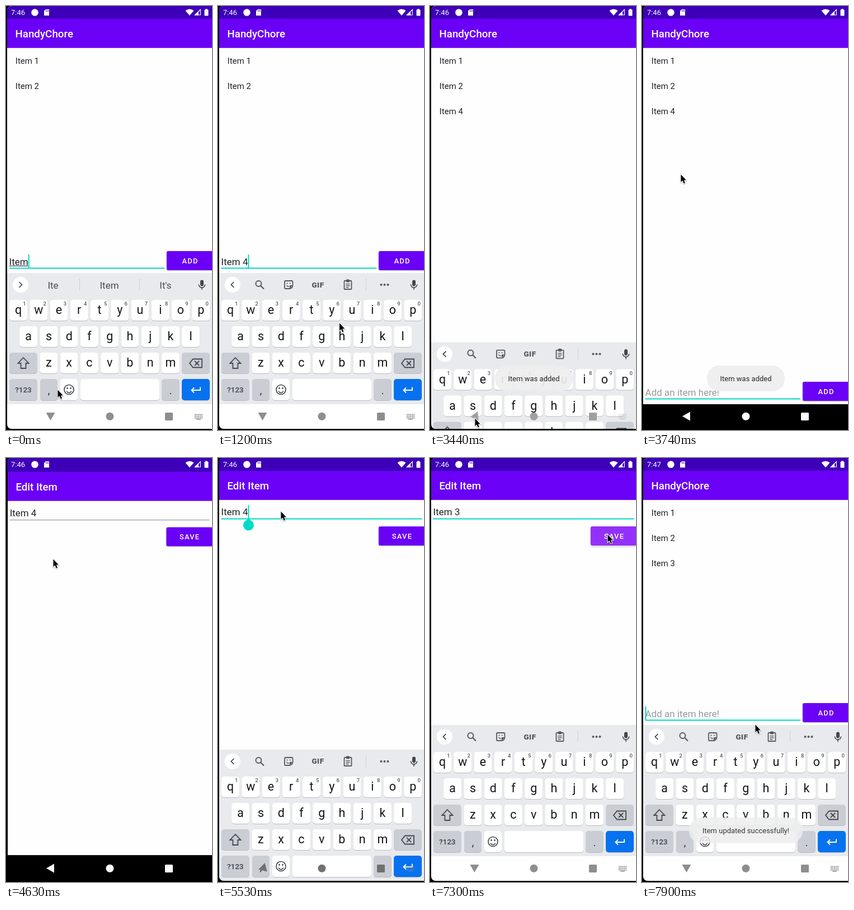
These frames come from a looping animation (368 px wide and 756 px high, 8000 ms). An HTML page with a canvas:

```html
<!DOCTYPE html>
<html lang="en">
<head>
<meta charset="utf-8">
<title>Task list</title>
<style>
html, body { margin: 0; width: 368px; height: 756px; overflow: hidden; background: #000; }
canvas { display: block; width: 368px; height: 756px; }
</style>
</head>
<body>
<canvas id="stage"></canvas>
<script>
const W = 368, H = 756, LOOP = 8000;
const PURPLE = '#6a00f6', DARK = '#3d00b8', TEAL = '#00dac6', PAPER = '#fefefe', INK = '#202124', ICON = '#55585c';
const FIELD = 5.6;
const canvas = document.getElementById('stage');
const dpr = window.devicePixelRatio || 1;
canvas.width = W * dpr;
canvas.height = H * dpr;
const c = canvas.getContext('2d');

const clamp = v => Math.max(0, Math.min(1, v));
const part = (t, a, b) => clamp((t - a) / (b - a));
const within = (t, a, b) => t >= a && t < b;

const ANCHORS = [0, 3590, 4630, 6270, 7300];
function stepTime(t) {
  const a = ANCHORS.filter(v => v <= t).pop();
  return a + Math.floor((t - a) / 150) * 150;
}

function rect(x, y, w, h, color) {
  c.fillStyle = color;
  c.fillRect(x, y, w, h);
}
function box(x, y, w, h, r, color) {
  c.fillStyle = color;
  c.beginPath();
  c.roundRect(x, y, w, h, r);
  c.fill();
}
function disc(x, y, r, color) {
  c.fillStyle = color;
  c.beginPath();
  c.arc(x, y, r, 0, 7);
  c.fill();
}
function trace(pts, close) {
  c.beginPath();
  pts.forEach(([x, y], i) => i ? c.lineTo(x, y) : c.moveTo(x, y));
  if (close) c.closePath();
}
function poly(pts, color) {
  trace(pts, true);
  c.fillStyle = color;
  c.fill();
}
function line(pts, color, width = 1.6, close = false) {
  trace(pts, close);
  c.strokeStyle = color;
  c.lineWidth = width;
  c.stroke();
}
function frame(x, y, w, h, r, color, width = 1.6) {
  c.beginPath();
  c.roundRect(x, y, w, h, r);
  c.strokeStyle = color;
  c.lineWidth = width;
  c.stroke();
}
function text(s, x, y, size, color, align = 'left', weight = 400, gap = 0) {
  c.font = `${weight} ${size}px Roboto, sans-serif`;
  c.letterSpacing = gap + 'px';
  c.textAlign = align;
  c.fillStyle = color;
  c.fillText(s, x, y);
  const w = c.measureText(s).width;
  c.letterSpacing = '0px';
  return w;
}
function layer(alpha, draw) {
  c.save();
  c.globalAlpha *= alpha;
  draw();
  c.restore();
}

function statusBar(t) {
  text(t >= 7600 ? '7:47' : '7:46', 9, 16.3, 13, '#fff');
  disc(51.5, 11.5, 6.3, '#fff');
  poly([[71, 6], [77, 6], [77, 17], [68, 17], [68, 9]], '#fff');
  [71, 73, 75].forEach(x => rect(x, 7.5, 1, 2.5, DARK));
  c.fillStyle = '#fff';
  c.beginPath();
  c.moveTo(328, 17);
  c.lineTo(320.5, 8.2);
  c.quadraticCurveTo(328, 3, 335.5, 8.2);
  c.fill();
  line([[337.5, 16], [347.3, 16], [347.3, 6.5]], '#fff', 1.2, true);
  poly([[337, 16.5], [344, 16.5], [344, 9.8]], '#fff');
  box(354.5, 6.5, 7, 11, 1, '#fff');
  rect(356.5, 5, 3, 2, '#fff');
}

function appScreen(title) {
  rect(2, 0, 372, 710, PAPER);
  rect(2, 0, 372, 23, DARK);
  rect(2, 22.5, 372, 52.3, PURPLE);
  text(title, 16.4, 56, 18.8, '#fff', 'left', 500);
}

function button(label, y, lit) {
  c.save();
  c.shadowColor = 'rgba(0,0,0,.3)';
  c.shadowBlur = (lit ? 4 : 2) * dpr;
  c.shadowOffsetY = dpr;
  box(287, y, 83, 34, 3, lit ? '#9430fb' : PURPLE);
  c.restore();
  text(label, 329, y + 22, 13, '#fff', 'center', 500, 1.2);
}

const blink = (t, since) => Math.floor((t - since) / 500) % 2 === 0;

function mainScreen(t) {
  appScreen('HandyChore');
  const items = ['Item 1', 'Item 2'];
  if (t >= 1950) items.push(t >= 7450 ? 'Item 3' : 'Item 4');
  items.forEach((s, i) => text(s, 16.8, 103 + i * 45, 15, INK));

  const dy = within(t, 3150, 7450) ? 233 : 0;
  const typed = t < 300 ? 'Item' : t < 750 ? 'Item ' : t < 1950 ? 'Item 4' : '';
  let w = 0;
  if (typed) w = text(typed, FIELD, 461.5 + dy, 17, INK);
  else text('Add an item here!', FIELD, 461.5 + dy, 17, '#999');
  if (t < 300) rect(FIELD, 463, w, 1, INK);
  rect(FIELD, 466.5 + dy, 277.4, 2, TEAL);
  const since = t < 300 ? 0 : t < 750 ? 300 : t < 1800 ? 750 : t < 7450 ? 1800 : 7450;
  if (blink(t, since) && !within(t, 3300, 7450)) rect(FIELD + w, 443 + dy, 2, 24, TEAL);
  button('ADD', 437 + dy, within(t, 1800, 2100));
}

function editScreen(t) {
  appScreen('Edit Item');
  const focus = t >= 5380;
  const typed = t < 6270 ? 'Item 4' : t < 6720 ? 'Item ' : 'Item 3';
  const w = text(typed, FIELD, 102, 17, INK);
  rect(FIELD, focus ? 107.5 : 108.5, 359, focus ? 2 : 1, focus ? TEAL : '#858585');
  const since = t < 6270 ? 5330 : t < 6720 ? 6270 : 6720;
  if (focus && blink(t, since)) rect(FIELD + w, 84, 2, 24, TEAL);
  if (within(t, 5380, 6270)) {
    disc(54.5, 119.7, 9.5, TEAL);
    poly([[54.5, 108.5], [60.8, 112.7], [48.2, 112.7]], TEAL);
  }
  button('SAVE', 122, within(t, 7300, 7600));
}

function mic() {
  box(347, 488.5, 6, 11, 3, '#44474a');
  c.beginPath();
  c.arc(350, 496.5, 5.6, 0, Math.PI);
  c.strokeStyle = '#44474a';
  c.lineWidth = 1.6;
  c.stroke();
  rect(349.2, 502, 1.6, 4, '#44474a');
}

function toolStrip() {
  c.strokeStyle = ICON;
  c.lineWidth = 2;
  c.beginPath();
  c.arc(72.5, 495, 5, 0, 7);
  c.stroke();
  line([[76, 498.5], [82, 504.5]], ICON, 2.2);
  // sticker
  frame(119, 490, 14.5, 14, [2, 2, 6, 2], ICON, 1.8);
  poly([[133.5, 498], [128, 504], [128, 498]], ICON);
  disc(123.5, 494.5, 1.1, ICON);
  disc(128.8, 494.5, 1.1, ICON);
  line([[122.5, 498], [124.5, 500], [127, 500]], ICON, 1.3);
  text('GIF', 178.5, 501.5, 13.5, ICON, 'center', 900, .5);
  // clipboard
  frame(225.5, 490, 13, 15, 1, ICON, 1.8);
  box(229, 487.5, 6, 5, 1, ICON);
  [495, 498, 501].forEach((y, i) => rect(228.5, y, i === 2 ? 5 : 7, 1.4, ICON));
  rect(264, 486, 1, 21, '#cdd0d4');
  [291.5, 297.5, 303.5].forEach(x => disc(x, 497, 2, ICON));
}

function key(x, y, w, color = '#fff', h = 37) {
  box(x, y + 1, w, h, 5, '#b9bcc1');
  box(x, y, w, h, 5, color);
}

function keyRow(letters, x0, y, digits) {
  [...letters].forEach((s, i) => {
    const x = x0 + i * 36.25;
    key(x - 16, y, 32);
    text(s, x, y + 25, 21.5, '#141414', 'center');
    if (digits) text((i + 1) % 10, x + 11, y + 10, 9.5, '#55585c', 'center', 500);
  });
}

function keyboard(t) {
  const GREY = '#cacdd3';
  rect(2, 476, 366, 234, '#e8eaed');
  rect(2, 710, 366, 60, '#fff');
  const words = t < 450 ? ['Ite', 'Item', "It's"]
    : t < 750 || within(t, 6270, 6720) ? ['1', 'is', 'number'] : null;
  disc(26, 497, 14, '#fff');
  const d = words ? 2.5 : -2.5;
  line([[26 - d, 492], [26 + d, 497], [26 - d, 502]], '#3c4043', 1.7);
  if (words) {
    words.forEach((s, i) => text(s, 84 + i * 100.5, 503.5, 17, '#4a4d51', 'center'));
    rect(131, 486, 1, 21, '#cdd0d4');
    rect(238, 486, 1, 21, '#cdd0d4');
  } else toolStrip();
  mic();

  keyRow('qwertyuiop', 22, 524, true);
  keyRow('asdfghjkl', 40.2, 571);
  keyRow('zxcvbnm', 76.4, 618);
  key(6, 618, 50, GREY);
  line([[31, 627], [40.5, 637], [35.5, 637], [35.5, 646], [26.5, 646], [26.5, 637], [21.5, 637]], '#44474a', 1.8, true);
  key(314, 618, 50, GREY);
  line([[328, 637], [334, 629.5], [350, 629.5], [350, 644.5], [334, 644.5]], '#44474a', 1.8, true);
  line([[337, 633], [345, 641]], '#44474a', 1.8);
  line([[345, 633], [337, 641]], '#44474a', 1.8);

  key(6, 665, 50, GREY, 38);
  text('?123', 31, 689, 13.5, '#3c4043', 'center', 500);
  key(61, 665, 31, GREY, 38);
  text(',', 76.5, 692, 18, '#222', 'center');
  key(97, 665, 31, '#fff', 38);
  c.strokeStyle = '#44474a';
  c.lineWidth = 1.7;
  c.beginPath();
  c.arc(112.5, 684, 8.5, 0, 7);
  c.stroke();
  c.beginPath();
  c.arc(112.5, 685, 4.6, .35, Math.PI - .35);
  c.stroke();
  disc(109.5, 681.5, 1.4, '#44474a');
  disc(115.5, 681.5, 1.4, '#44474a');
  key(133, 665, 141, '#fff', 38);
  key(278, 665, 32, GREY, 38);
  text('.', 294, 692, 18, '#222', 'center');
  key(314, 665, 50, '#0672ef', 38);
  line([[347, 679.5], [347, 685], [332, 685]], '#fff', 1.9);
  line([[336, 680.5], [331.5, 685], [336, 689.5]], '#fff', 1.9);
}

function navIcons(p) {
  // White darkens quickly, then eases back to a mid grey.
  const v = Math.round(255 - 143 * clamp(p * 2) + 30 * clamp(p * 2 - 1));
  const tone = `rgb(${v},${v},${v})`;
  c.save();
  c.translate(79.5, 731.5);
  c.rotate(-(p ** 2.6) * Math.PI / 2);
  poly([[-7.5, 0], [6.5, -8], [6.5, 8]], tone);
  c.restore();
  disc(185.5, 731.8, 7, tone);
  box(284, 725, 14, 14, 1.5, tone);
  layer(p, () => {
    for (let row = 0; row < 3; row++)
      for (let i = 0; i < 5; i++) rect(337 + i * 3, 727.5 + row * 3, 2, 2, '#8d8d8d');
    rect(340, 736, 8, 1.5, '#8d8d8d');
  });
}

function toast(label, w, alpha) {
  layer(alpha, () => {
    box(185.5 - w / 2, 641, w, 46, 22, 'rgba(238,238,238,.93)');
    text(label, 185.5, 669, 13, '#252525', 'center');
  });
}

const PATH = [
  [750, 92, 684], [1650, 341, 446], [2400, 341, 446], [2700, 331, 737],
  [2850, 80, 735], [3300, 80, 735], [3740, 69, 300], [4190, 76, 190],
  [4340, 78, 189], [4630, 84, 180], [4780, 84, 180], [5230, 112, 95],
  [6720, 112, 95], [7150, 317, 136], [7450, 317, 136], [7900, 202, 475]
];
function pointer(t) {
  const n = PATH.findIndex(k => k[0] > t);
  const b = PATH[n < 0 ? PATH.length - 1 : n];
  const a = n > 0 ? PATH[n - 1] : b;
  const p = n > 0 ? part(t, a[0], b[0]) : 0;
  const e = p * p * (3 - 2 * p);
  c.save();
  c.translate(a[1] + (b[1] - a[1]) * e, a[2] + (b[2] - a[2]) * e);
  const arrow = [[.5, .5], [.5, 14], [3.5, 11.3], [5.8, 16.4], [8, 15.4], [5.8, 10.4], [9.8, 10.2]];
  c.shadowColor = 'rgba(0,0,0,.35)';
  c.shadowBlur = 2 * dpr;
  c.shadowOffsetY = dpr;
  line(arrow, '#fff', 2, true);
  c.shadowColor = 'transparent';
  poly(arrow, '#000');
  c.restore();
}

function draw(t) {
  c.setTransform(dpr, 0, 0, dpr, 0, 0);
  rect(0, 0, W, H, '#000');
  c.save();
  c.beginPath();
  c.roundRect(2, 0, 374, 754, [8, 0, 0, 8]);
  c.clip();

  const open = part(t, 4340, 4740), close = part(t, 7450, 7750);
  if (open < 1 || close > 0) mainScreen(t);
  if (open > 0 && close < 1) {
    if (close === 0) layer(clamp(open * 1.5), () => rect(2, 0, 366, 710, '#000'));
    layer(close ? 1 - close : clamp(open * 2), () => {
      const s = 1 - .28 * (1 - open) ** 3;
      c.translate(187, 378);
      c.scale(s, s);
      c.translate(-187, -378);
      editScreen(t);
    });
    // the status strip stays in place while the window grows
    if (open > .5) rect(2, 0, 366, 23, DARK);
  }
  rect(2, 710, 366, 46, '#000');

  const down = part(t, 3000, 3450), up = part(t, 5380, 5680);
  const shown = t < 5000 ? 1 - down * down : 1 - (1 - up) ** 2.66;
  if (shown > 0) {
    c.save();
    c.translate(0, 278 * (1 - shown));
    keyboard(t);
    c.restore();
  }
  navIcons(t < 5000 ? 1 - down : up);
  statusBar(t);
  toast('Item was added', 139, part(t, 1800, 2150) * (1 - part(t, 3850, 4190)));
  toast('Item updated successfully!', 203, part(t, 7600, 7930));
  pointer(t);
  c.restore();
}

const start = performance.now();
function tick() {
  draw(stepTime((performance.now() - start) % LOOP));
  requestAnimationFrame(tick);
}
tick();
</script>
</body>
</html>
```
